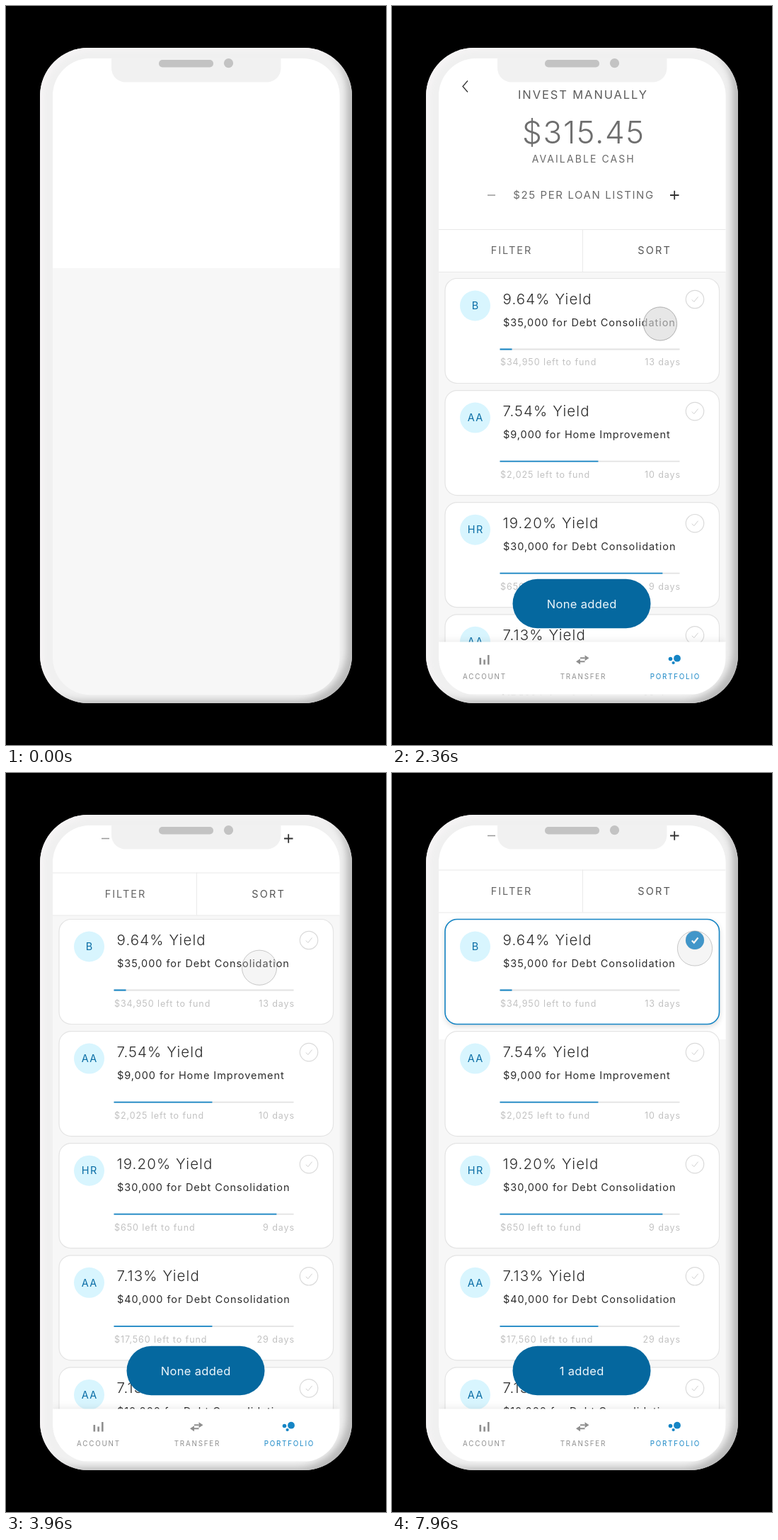
An HTML page with a canvas for the animation above (8000 ms loop, 537 px wide and 1043 px high).

```html
<!DOCTYPE html>
<html lang="en">
<head>
<meta charset="utf-8">
<title>Invest manually</title>
<style>
  html, body { margin: 0; width: 100%; height: 100%; overflow: hidden; background: #000; }
  #phone, canvas { position: absolute; }
  #phone {
    left: 48px; top: 59px; width: 441px; height: 925px; border-radius: 68px; background: #f0f0f0;
    box-shadow: inset 5px 4px 6px #f6f4f5, inset -12px -8px 10px -4px #bababa;
  }
  canvas { left: 0; top: 0; width: 537px; height: 1043px; }
</style>
</head>
<body>
<div id="phone"></div>
<canvas></canvas>
<script>
const LOOP = 8000;
const BLUE = '#1585c5', LINE = '#e9e9e9', ICON = '#8f8f8f';
const loans = [
  { grade: 'B',  yield: '9.64%',  title: '$35,000 for Debt Consolidation', left: '$34,950', days: 13, funded: .067 },
  { grade: 'AA', yield: '7.54%',  title: '$9,000 for Home Improvement',    left: '$2,025',  days: 10, funded: .547 },
  { grade: 'HR', yield: '19.20%', title: '$30,000 for Debt Consolidation', left: '$650',    days: 9,  funded: .905 },
  { grade: 'AA', yield: '7.13%',  title: '$40,000 for Debt Consolidation', left: '$17,560', days: 29, funded: .547 },
  { grade: 'AA', yield: '7.13%',  title: '$10,000 for Debt Consolidation', left: '$7,500',  days: 29, funded: .25 },
];

const canvas = document.querySelector('canvas');
const dpr = window.devicePixelRatio || 1;
canvas.width = 537 * dpr;
canvas.height = 1043 * dpr;
const ctx = canvas.getContext('2d');

// Timing helpers
const span = (t, from, to) => Math.min(1, Math.max(0, (t - from) / (to - from)));
const mix = (a, b, p) => a + (b - a) * p;
const quad = u => u < .5 ? 2 * u * u : 1 - 2 * (1 - u) ** 2;
const sine = u => (1 - Math.cos(Math.PI * u)) / 2;
const sineOut = u => Math.sin(Math.PI * u / 2);

// Drawing helpers
function withState(alpha, draw) {
  if (alpha <= 0) return;
  ctx.save();
  ctx.globalAlpha *= alpha;
  draw();
  ctx.restore();
}
function text(str, x, y, size, color, spacing = 0, align = 'left', weight = 400) {
  ctx.font = `${weight} ${size}px Inter, sans-serif`;
  ctx.letterSpacing = spacing + 'px';
  ctx.textAlign = align;
  ctx.fillStyle = color;
  const trailing = { left: 0, center: spacing / 2, right: spacing }[align];
  ctx.fillText(str, x + trailing, y);
}
function rect(x, y, w, h, color, radius = 0) {
  ctx.beginPath();
  ctx.roundRect(x, y, w, h, radius);
  ctx.fillStyle = color;
  ctx.fill();
}
function disc(x, y, r, color) {
  ctx.beginPath();
  ctx.arc(x, y, r, 0, 2 * Math.PI);
  ctx.fillStyle = color;
  ctx.fill();
}
function stroke(color, width) {
  ctx.strokeStyle = color;
  ctx.lineWidth = width;
  ctx.stroke();
}
function polyline(points, color, width) {
  ctx.beginPath();
  points.forEach(([x, y]) => ctx.lineTo(x, y));
  stroke(color, width);
}

function drawHeader(t, scroll, added) {
  const shift = -174.5 * scroll - 4 * added;
  const bottom = mix(370, 375.5, span(t, 120, 600)) - 174.5 * scroll;
  rect(66, 74, 406, mix(bottom, 376, added) - 74, '#fff');
  withState(span(t, 120, 560), () => {
    ctx.translate(0, shift);
    polyline([[107, 105.5], [100, 113.5], [107, 121.5]], '#333', 1.3);
    text('INVEST MANUALLY', 269, 131.5, 16.5, '#5c5c5c', 1.9, 'center');
    text('$315.45', 270, 194, 44, '#6e6e6e', 1.7, 'center', 300);
    text('AVAILABLE CASH', 269.7, 221, 14, '#6a6a6a', 2.1, 'center');
    text('$25 PER LOAN LISTING', 270.2, 272.5, 15, '#6a6a6a', 1.6, 'center');
    polyline([[135, 267], [146, 267]], '#999', 1.4);
    polyline([[393, 267], [405.5, 267]], '#333', 1.8);
    polyline([[399.2, 260.8], [399.2, 273.2]], '#333', 1.8);
    rect(66, 315, 406, 1, LINE);
    rect(66, 375, 406, 1, LINE);
    rect(269, 315, 1, 60, LINE);
    text('FILTER', 168, 350.2, 14.5, '#666', 2, 'center');
    text('SORT', 370, 350.2, 14.5, '#555', 2.2, 'center');
  });
}

function drawCheck(selected) {
  const tick = [[423.8, 30.5], [426.8, 33.5], [432.5, 26.5]];
  ctx.beginPath();
  ctx.arc(428, 30, 12.7, 0, 2 * Math.PI);
  stroke('#dadada', 1.2);
  polyline(tick, '#d0d0d0', 1);
  withState(selected, () => {
    disc(428, 30, 13, '#0f80c4');
    polyline(tick, '#fff', 2.2);
  });
}

function drawCard(loan, top, alpha, selected, flash) {
  withState(alpha, () => {
    ctx.translate(0, top);
    ctx.save();
    ctx.shadowColor = `rgba(0,0,0,${.16 * selected})`;
    ctx.shadowBlur = 8 * dpr;
    ctx.shadowOffsetY = 3 * dpr;
    rect(75, .5, 387.5, 148, '#fff', 17);
    ctx.restore();
    withState(flash, () => rect(80, 5, 377, 138, '#f8f8f8', 14));
    ctx.beginPath();
    ctx.roundRect(75, .5, 387.5, 148, 17);
    stroke('#e4e4e4', 1.2);
    withState(selected, () => stroke(BLUE, 1.6));

    disc(117.5, 39, 21.5, '#d8f5fe');
    text(loan.grade, 117.5, 44.2, 14.5, '#0b6ea6', 1.5, 'center');
    text(loan.yield + ' Yield', 156.5, 37, 20.5, '#2c2c2c', 1.1, 'left', 300);
    text(loan.title, 157, 68, 14.5, '#2c2c2c', .95);
    rect(152.5, 99.6, 254, 1.8, '#e2e2e2');
    rect(152.5, 99.6, 254 * loan.funded, 1.8, BLUE);
    text(loan.left + ' left to fund', 153, 123.5, 12.5, '#c2c2c2', .93);
    text(loan.days + ' days', 407, 123.5, 12.5, '#c2c2c2', .9, 'right');
    drawCheck(selected);
  });
}

function drawCards(t, scroll) {
  const selected = span(t, 5520, 5700);
  const flash = Math.sin(Math.PI * span(t, 5500, 5720));
  loans.forEach((loan, i) => {
    const entry = span(t, 340 + 110 * i, 740 + 110 * i);
    const top = 384 + 158.1 * i - 178 * scroll + 40 * (1 - entry);
    drawCard(loan, top, Math.min(1, entry * 1.3), i ? 0 : selected, i ? 0 : flash);
  });
}

function arrow(tail, y, dir) {
  const tip = tail + 12.5 * dir, neck = tip - 6 * dir;
  polyline([[tail, y], [neck, y]], ICON, 2);
  ctx.beginPath();
  ctx.moveTo(tip, y);
  ctx.lineTo(neck, y - 4);
  ctx.lineTo(neck, y + 4);
  ctx.fillStyle = ICON;
  ctx.fill();
}

function drawTabs(t) {
  withState(span(t, 400, 920), () => {
    ctx.save();
    ctx.shadowColor = 'rgba(0,0,0,.12)';
    ctx.shadowBlur = 12 * dpr;
    rect(66, 897.5, 406, 73.8, '#fff');
    ctx.restore();
    [[123.5, 920], [129.3, 922.5], [135, 916]].forEach(([x, y]) => rect(x, y, 2.6, 929.5 - y, ICON));
    arrow(266, 920.3, 1);
    arrow(272.5, 925.2, -1);
    disc(403, 920.7, 4.9, BLUE);
    disc(393.5, 921.5, 2.8, BLUE);
    disc(397.6, 927, 2.1, BLUE);
    text('ACCOUNT', 130, 949.6, 9.8, ICON, 1.8, 'center');
    text('TRANSFER', 269.5, 949.6, 9.8, ICON, 1.8, 'center');
    text('PORTFOLIO', 399.5, 949.6, 9.8, BLUE, 1.8, 'center');
  });
}

function drawToast(t) {
  const entry = sineOut(span(t, 960, 1400));
  const dip = Math.sin(Math.PI * span(t, 5520, 6000));
  const scale = mix(.4, 1, entry) - .44 * dip;
  const pill = (inset, alpha) => withState(alpha, () => {
    const w = 195 * scale - inset, h = 69.5 * scale - inset;
    rect(268 - w / 2, 843.5 - h / 2, w, h, '#05689f', h / 2);
  });
  const solid = entry * (1 - .9 * dip);
  pill(0, solid);
  if (dip > 0) pill(6, .65);

  const label = (str, start, end, fade) => {
    const p = sineOut(span(t, start, end));
    withState(p * fade, () => text(str, 268 + 38 * (1 - p), 849.7, 16.5, '#edf6fb', .35, 'center'));
  };
  label('None added', 1300, 1760, 1 - span(t, 5520, 5720));
  label('1 added', 6400, 6920, 1);
}

function cursorPosition(t, scroll) {
  if (t < 2360) {
    const p = quad(span(t, 860, 1880));
    return [mix(447, 379, p), mix(62, 454, p)];
  }
  if (t < 3800) return [mix(379, 355.5, Math.sqrt(scroll)), mix(448.5, 276, scroll)];
  const p = sine(span(t, 3880, 4560));
  return [mix(355.5, 428, p), mix(276, 239.5, p) + 8 * span(t, 7880, 7960) ** 2];
}

function drawCursor(t, scroll) {
  const [x, y] = cursorPosition(t, scroll);
  const press = t < 4000 ? +(t >= 2120 && t < 3560) : t < 4960 ? 0 : 1 - span(t, 5530, 5580);
  withState(span(t, 840, 920), () => {
    ctx.beginPath();
    ctx.roundRect(48, 59, 441, 925, 68);
    ctx.clip();
    disc(x, y, 24.6 - press, `rgba(216,216,216,${mix(.25, .6, press)})`);
    stroke(`rgba(150,150,150,${mix(.5, .75, press)})`, 1);
  });
}

function draw(t) {
  const scroll = quad(span(t, 2360, 3392));
  const added = sineOut(span(t, 5520, 6320));
  ctx.setTransform(dpr, 0, 0, dpr, 0, 0);
  ctx.clearRect(0, 0, 537, 1043);

  ctx.save();
  ctx.beginPath();
  ctx.roundRect(66, 74, 405.5, 898.2, 53);
  ctx.clip();
  rect(66, 74, 406, 899, '#f7f7f7');
  drawHeader(t, scroll, added);
  drawCards(t, scroll);
  drawTabs(t);
  drawToast(t);
  ctx.restore();

  rect(149, 73, 239.5, 34.5, '#f1f1f1', [0, 0, 20, 20]);
  rect(216, 76, 77, 10.5, '#c3c3c3', 5);
  disc(314.5, 80.7, 6.6, '#c3c3c3');
  drawCursor(t, scroll);
}

function frame() {
  draw(performance.now() % LOOP);
  requestAnimationFrame(frame);
}
frame();
</script>
</body>
</html>
```
